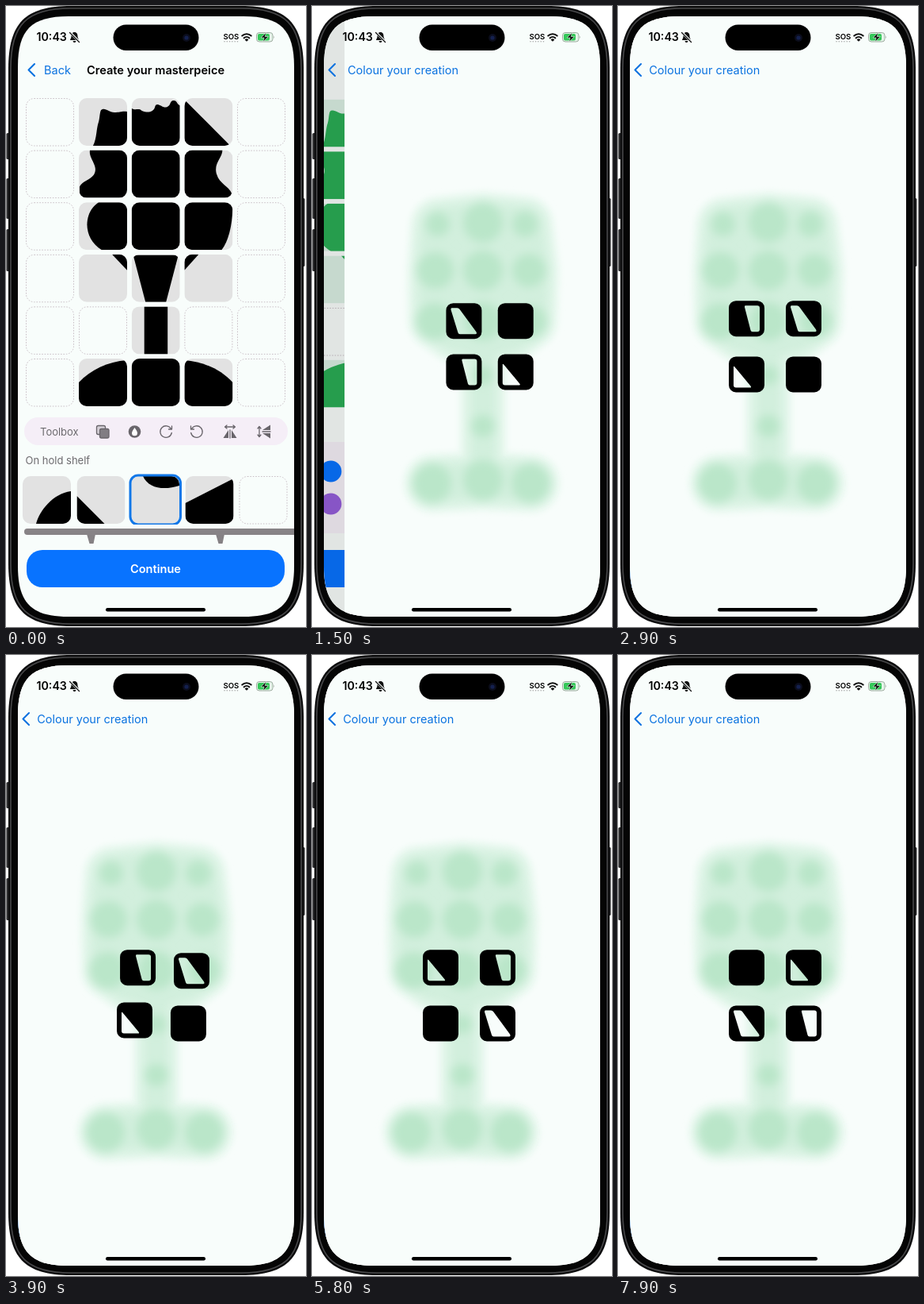
Write an HTML page that moves like this. It is 379 px wide and 782 px high and loops after 8000 ms.

```html
<!DOCTYPE html>
<html lang="en">
<head>
<meta charset="utf-8">
<title>Puzzle colouring</title>
<style>
  html, body { margin: 0; width: 100%; height: 100%; overflow: hidden; background: #fff; }
  svg { display: block; width: 379px; height: 782px; }
  text { font-family: Inter, Roboto, "Liberation Sans", sans-serif; font-size: 14.6px; }
  .b { font-weight: 600; }
  .s { font-size: 13px; fill: #6c6a6e; }
  .link { fill: #0a72e0; font-size: 14.5px; }
</style>
</head>
<body>
<svg id="stage" viewBox="0 0 379 782" xmlns="http://www.w3.org/2000/svg"></svg>
<script>
const BG = '#f8fdfb', BLUE = '#0873ff', GREEN = '#2aad55', LILAC = '#f5eff7';
const COLS = [25, 92, 158.7, 225.4, 292], PITCH = 65.6;
const FULL = 'M0 0H61V60H0Z';

// Puzzle pieces by "row,column", in tile coordinates
const PIECES = {
  '0,1': 'M18 60C23 50 22 38 25 30C27 23 26 14 30 14C35 13 38 18 45 18C52 18 54 16 61 17V60Z',
  '0,2': 'M0 13C5 16 9 12 13 16C19 18 22 18 26 16C31 13 28 8 33 8C38 9 40 13 45 11C50 9 48 3 53 3C58 3 57 8 61 9V60H0Z',
  '0,3': 'M0 2L58 60H0Z',
  '1,1': 'M14 0C12 11 26 20 19 31C14 38 4 39 1 46V60H61V0Z',
  '1,2': FULL,
  '1,3': 'M0 0H48C48 10 36 17 41 31C44 42 56 45 60 55V60H0Z',
  '2,1': 'M25 0C5 13 5 46 29 60H61V0Z',
  '2,2': FULL,
  '2,3': 'M0 0H61V8C60 30 56 48 47 60H0Z',
  '3,1': 'M42 0H61V20Z',
  '3,2': 'M2 1H59L43.500 60H17.500Z',
  '3,3': 'M0 0H18L0 20Z',
  '4,2': 'M16 0H45.500V60H16Z',
  '5,1': 'M0 30C15 14 36 4 61 2V60H0Z',
  '5,2': FULL,
  '5,3': 'M0 2C25 4 46 14 61 30V60H0Z'
};

const rect = (x, y, w, h, r, fill, more = '') =>
  `<rect x="${x}" y="${y}" width="${w}" height="${h}" rx="${r}" fill="${fill}" ${more}/>`;
const circle = (x, y, r, fill, more = '') => `<circle cx="${x}" cy="${y}" r="${r}" fill="${fill}" ${more}/>`;
const path = (d, fill, more = '') => `<path d="${d}" fill="${fill}" ${more}/>`;
const line = (d, color, w, more = '') =>
  path(d, 'none', `stroke="${color}" stroke-width="${w}" stroke-linecap="round" stroke-linejoin="round" ${more}`);
const text = (x, y, s, cls = '', more = '') => `<text x="${x}" y="${y}" class="${cls}" ${more}>${s}</text>`;
const group = (id, body, more = '') => `<g id="${id}" ${more}>${body}</g>`;

// Rectangle with continuous corners: the curve starts early and eases in
function smooth(x, y, w, h, r) {
  const e = 1.3 * r, c = .348 * r, X = x + w, Y = y + h;
  return `M${x + e} ${y}H${X - e}C${X - c} ${y} ${X} ${y + c} ${X} ${y + e}V${Y - e}` +
    `C${X} ${Y - c} ${X - c} ${Y} ${X - e} ${Y}H${x + e}C${x + c} ${Y} ${x} ${Y - c} ${x} ${Y - e}` +
    `V${y + e}C${x} ${y + c} ${x + c} ${y} ${x + e} ${y}Z`;
}

const tile = (x, y, d, bg, fg) =>
  `<g transform="translate(${x} ${y})" clip-path="url(#tile)">${rect(0, 0, 61, 60, 0, bg)}${path(d, fg)}</g>`;
const slot = (x, y) =>
  rect(x + .5, y + .5, 60, 59.5, 10, 'none', 'stroke="#c9bfc6" stroke-dasharray="1.6 1.8"');

function board(top, bg, fg) {
  let out = '';
  for (let r = 0; r < 6; r++) COLS.forEach((x, c) => {
    const d = PIECES[r + ',' + c], y = top + r * PITCH;
    out += d ? tile(x, y, d, bg, fg) : slot(x, y);
  });
  return out;
}

const chevron = x => line(`M${x + 9} 73L${x + 1.5} 80.500L${x + 9} 88`, '#0a72e0', 2.1);
const pageBack = rect(15, 13, 349, 756, 0, BG);
const button = rect(26, 685, 326, 47, 20, BLUE) +
  text(189, 714, 'Continue', 'b', 'fill="#fff" text-anchor="middle"');

function toolbox() {
  const g = '#69656b';
  const turn = 'M6.500 -3.500A7.300 7.300 0 1 0 7.300 1.500M7.500 -7V-3H3.500';
  const flip = line('M-6 -6H6M-4 -8L-6.500 -6L-4 -4M4 -8L6.500 -6L4 -4M0 -2V8', g, 1.3) +
    path('M-2 -2V8H-8.500ZM2 -2V8H8.500Z', g);
  const at = (x, body, more = '') => `<g transform="translate(${x} 536) ${more}">${body}</g>`;
  return rect(23, 518, 333, 35, 17.5, '#f5eef7') + text(43, 541, 'Toolbox', 's') +
    at(122, rect(-7.5, -7.5, 11, 11, 2, '#d3ced5', `stroke="${g}" stroke-width="1.3"`) +
      rect(-3.5, -3.5, 11.5, 11.5, 2, '#817d83', `stroke="${g}" stroke-width="1.3"`)) +
    at(162.5, circle(0, 0, 7.8, g) + path('M0 -5C2 -2 3.500 0 3.500 1.800A3.500 3.500 0 0 1 -3.500 1.800C-3.500 0 -2 -2 0 -5Z', '#fff')) +
    at(202, line(turn, g, 1.3)) +
    at(241, line(turn, g, 1.3), 'scale(-1 1)') +
    at(283, flip) +
    at(326, flip, 'rotate(-90)');
}

function shelf() {
  const grey = '#e2e2e2', y = 592;
  return text(24.5, 577, 'On hold shelf', 's') +
    `<g clip-path="url(#shelfTop)">` +
    tile(21, y, 'M17 60C21 44 38 22 61 19V60Z', grey, '#000') +
    tile(89.5, y, 'M0 25L35 60H0Z', grey, '#000') +
    tile(158, y, 'M15 0C22 16 42 18 61 12V0Z', grey, '#000') +
    rect(157, 591, 63.5, 62, 10, 'none', 'stroke="#1177e8" stroke-width="3"') +
    tile(226.5, y, 'M0 34L61 3V60H0Z', grey, '#000') +
    slot(294.5, y) + '</g>' +
    path('M102 665H113L110.500 677H105.500ZM265 665H276L273.500 677H268.500Z', '#858184') +
    path('M27 658H364V666H27A4 4 0 0 1 27 658Z', '#878386');
}

function palette() {
  const colors = ['#000', BLUE, GREEN, '#ffb005', '#ff9d1c', '#6b59dd', '#955edb', '#4594cc', '#ff4b2e', '#9a8570'];
  return text(189, 534, 'Select a colour', 's', 'text-anchor="middle"') +
    rect(27, 549, 324, 115, 11, LILAC) +
    colors.map((c, i) => circle(53 + 68 * (i % 5), i < 5 ? 586 : 627, 13.5, c,
      i === 2 ? 'stroke="#8b8a8d" stroke-width="2.5"' : '')).join('');
}

// Soft goblet: stacked contours, each tighter and darker
function glow() {
  const bowl = 'M135 277L190 271L242 276L249 333L247 396L225 412L190 420L155 412L132 396L131 333Z';
  const base = 'M127 601L190 598L250 601';
  const layer = (r, stem, color, blur) =>
    `<g filter="url(#blur${blur})" stroke="${color}" stroke-linecap="round" stroke-linejoin="round" fill="none">
      <path d="${bowl}" fill="${color}" stroke-width="${r * 2}"/>
      <path d="${base}" stroke-width="${r * 2}"/>
      <path d="M190 420V590" stroke-width="${stem * 2}"/></g>`;
  const nodes = [[133, 275, 15], [190, 273, 25], [243, 275, 16], [130, 333, 23], [190, 333, 25], [248, 333, 21],
    [129, 397, 23], [190, 397, 24], [250, 397, 20], [190, 465, 12], [190, 529, 14],
    [126, 601, 24], [190, 597, 25], [250, 601, 24]];
  return layer(39, 31, '#ecf9f2', 3) + layer(32, 24, '#e0f5e8', 3) + layer(24, 16, '#d2efdd', 6) +
    `<g filter="url(#blur6)">${nodes.map(([x, y, r]) => circle(x, y, r, '#bae6c9')).join('')}</g>`;
}

// Loader tiles with see-through cuts, clockwise from top left at the start
const CHIP = 'M9 0H36A9 9 0 0 1 45 9V36A9 9 0 0 1 36 45H9A9 9 0 0 1 0 36V9A9 9 0 0 1 9 0Z';
const CUTS = [
  'M7 6H14Q16 6 17 7.500L38 36Q39.500 39 37 39H17.500Q15.500 39 15 37L6 8Q6 6 7 6Z',
  '',
  'M6 13Q6 11.500 7.500 13L27.500 37Q29 39 27 39H9Q6 39 6 36Z',
  'M21 6H36Q39 6 39 9V36Q39 39 36 39H30Q28 39 27.500 37L20 8Q19.500 6 21 6Z'
];
const loader = CUTS.map(d => '<g class="chip">' +
  path(CHIP + d, '#000', 'fill-rule="evenodd" transform="translate(-22.5 -22.5)"') + '</g>').join('');

function status() {
  return text(38.5, 44.3, '10:43', 'b', 'style="font-size:14.2px"') +
    path('M86.500 33C83.500 33 82.500 35.500 82.500 38C82.500 40.500 81 41.500 81 43H92C92 41.500 90.500 40.500 90.500 38C90.500 35.500 89.500 33 86.500 33ZM84.500 44H88.500A2 2 0 0 1 84.500 44Z', '#111') +
    line('M80.500 33L92.500 45', BG, 3) + line('M80.500 33.500L92.500 45.500', '#111', 1.2) +
    text(274.5, 41.5, 'SOS', 'b', 'style="font-size:9.6px"') +
    line('M276 44.800H293', '#aaa', 1.6, 'stroke-dasharray="0 3.3"') +
    line('M298.300 37.500A8.200 8.200 0 0 1 309.700 37.500M300.700 40.300A4.800 4.800 0 0 1 307.300 40.300', '#111', 2.1) +
    path('M304 44.800L301.600 42.400A3.400 3.400 0 0 1 306.400 42.400Z', '#111') +
    rect(316.5, 33.5, 20.5, 11.5, 3.5, '#e4f4e8', 'stroke="#9dab9f"') +
    rect(318, 35, 15, 8.5, 2, '#34c759') +
    path('M338.300 37.500Q340 39.200 338.300 41Z', '#9dab9f') +
    path('M328.500 33.500L322 40H326L324.800 45L331.500 38.500H327.300Z', '#111', 'stroke="#e4f4e8" stroke-width=".6"') +
    rect(135.5, 23.5, 108, 32.5, 16.2, '#000') +
    circle(228, 40, 5, '#0b0d1c') + circle(228, 40, 2.6, '#14204e') +
    rect(126, 758, 126, 4.5, 2.2, '#000');
}

const buttons = [[.5, 160, 33], [.5, 217, 51], [.5, 281, 53], [372.5, 242, 86]]
  .map(([x, y, h]) => rect(x, y, 5, h, 1.5, '#29292b')).join('');

const stage = document.getElementById('stage');
stage.innerHTML = `<defs>
    <clipPath id="screen"><path d="${smooth(15, 13, 349, 756, 49)}"/></clipPath>
    <clipPath id="tile"><rect width="61" height="60" rx="10"/></clipPath>
    <clipPath id="shelfTop"><rect x="15" y="585" width="349" height="68"/></clipPath>
    ${[3, 6].map(b => `<filter id="blur${b}" filterUnits="userSpaceOnUse" x="15" y="180" width="349" height="520"><feGaussianBlur stdDeviation="${b}"/></filter>`).join('')}
  </defs>` + buttons +
  path(smooth(3, 0, 373, 781, 61), '#0c0c0d') +
  path(smooth(6, 3, 367, 775, 58), '#050505', 'stroke="#48484a" stroke-width="1.6"') +
  '<g clip-path="url(#screen)">' +
  group('build', pageBack + board(116, '#e2e2e2', '#000') + toolbox() + shelf() + button +
    chevron(27) + text(48, 86, 'Back', 'link') + text(189, 86, 'Create your masterpeice', 'b', 'text-anchor="middle"')) +
  group('colour', pageBack + board(117.6, '#daefe3', GREEN) + palette() + button + rect(15, 13, 349, 756, 0, '#000', 'id="dim"')) +
  group('wait', pageBack + glow() + loader) +
  group('nav', chevron(20) + text(39.2, 86, 'Back', 'link', 'id="back"') +
    group('title', text(0, 86, 'Colour your creation', 'b', 'id="bold"') + text(0, 86, 'Colour your creation', 'link', 'id="plain"'))) +
  status() + '</g>';

const $ = id => document.getElementById(id);
const chips = [...document.querySelectorAll('.chip')];
const shift = (el, x, y = 0) => el.setAttribute('transform', `translate(${x} ${y})`);
const fade = (el, o) => { el.style.opacity = o; };
const clamp = v => Math.max(0, Math.min(1, v));
const ease = u => .5 - .5 * Math.cos(Math.PI * clamp(u));

const LOOP = 8000, PUSH = 1150, SPREAD = 1200, TURN = 1693, PERIOD = 2100, TURN_TIME = 700;
const CORNERS = [[-.5, -.5], [.5, -.5], [.5, .5], [-.5, .5]];

// The picture advances in held steps
function held(t) {
  if (t >= 1200) return Math.floor(t / 100) * 100;
  return [1160, 660, 580, 500, 0].find(s => t >= s);
}

function placeChips(t) {
  const open = ease((t - SPREAD) / (TURN - SPREAD));
  const w = 52 + 20 * open, h = 52 + 18.3 * open;
  const since = Math.max(0, t - TURN);
  const turns = Math.floor(since / PERIOD) + ease(since % PERIOD / TURN_TIME);
  chips.forEach((chip, i) => {
    const pos = i + turns, k = Math.floor(pos), f = pos - k;
    const a = CORNERS[k % 4], b = CORNERS[(k + 1) % 4];
    shift(chip, 198.5 + w * (a[0] + (b[0] - a[0]) * f), 428.8 + h * (a[1] + (b[1] - a[1]) * f));
  });
}

function draw(t) {
  const mix = t < 500 ? 0 : clamp((t - 420) / 240);
  const x = Math.max(0, t - PUSH) * .01215;
  const p = 1 - (1 + x) * Math.exp(-x);
  fade($('colour'), mix);
  fade($('nav'), mix);
  shift($('colour'), -105 * p);
  fade($('dim'), .1 * p);
  shift($('wait'), 349 * (1 - p));
  shift($('title'), 39.2 + 77 * (1 - p));
  fade($('bold'), clamp(1 - 1.3 * p));
  fade($('plain'), clamp(1.3 * p));
  shift($('back'), -40 * p);
  fade($('back'), clamp(1 - 2 * p));
  placeChips(t);
}

const start = performance.now();
function tick() {
  draw(held((performance.now() - start) % LOOP));
  requestAnimationFrame(tick);
}
tick();
</script>
</body>
</html>
```
